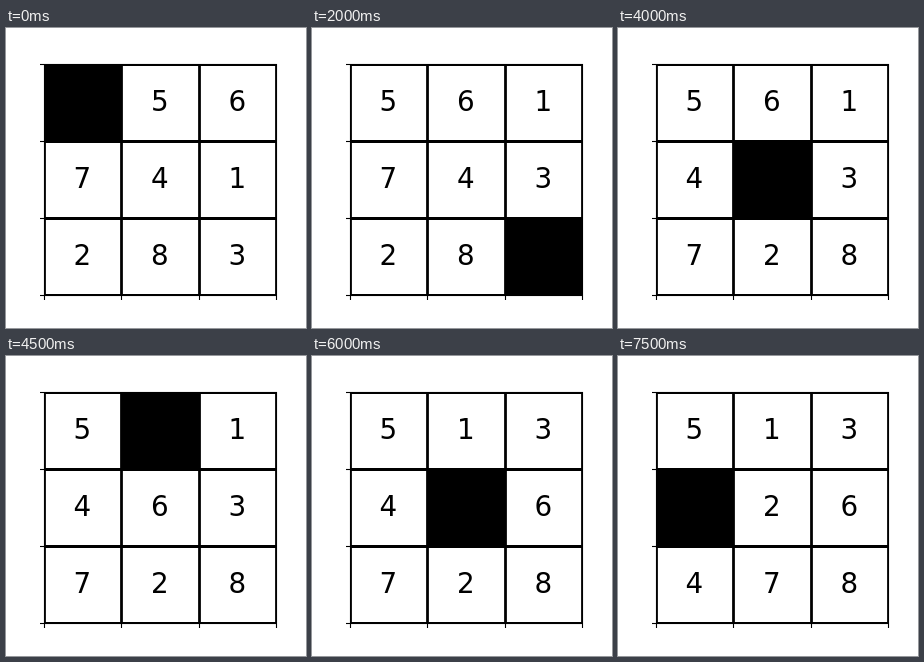
Animation of 300x300 px, one loop 8 s. Source, as an HTML page with a canvas:

```html
<!DOCTYPE html>
<html lang="en">
<head>
<meta charset="utf-8">
<title>Sliding puzzle</title>
<style>
  html, body { margin: 0; width: 100%; height: 100%; overflow: hidden; background: #fff; }
  canvas { display: block; width: 300px; height: 300px; }
</style>
</head>
<body>
<canvas id="stage" width="300" height="300"></canvas>
<script>
const ctx = document.getElementById('stage').getContext('2d');
const STEP = 500;
const START = [0, 5, 6, 7, 4, 1, 2, 8, 3];
// Cell index of the gap after each move
const PATH = [0, 1, 2, 5, 8, 7, 6, 3, 4, 1, 2, 5, 4, 7, 6, 3];
// Pixel positions of the grid lines
const X = [38, 115, 193, 270];
const Y = [36, 113, 190, 267];
const LEFT = 37.5, TOP = 36, CELL_W = 77.5, CELL_H = 77;
const GRID = 2.78, THIN = 1.11, TICK = 5;

function boardAt(step) {
  const board = START.slice();
  for (let i = 1; i <= step; i++) {
    board[PATH[i - 1]] = board[PATH[i]];
    board[PATH[i]] = 0;
  }
  return board;
}

function line(x1, y1, x2, y2, width) {
  ctx.lineWidth = width;
  ctx.beginPath();
  ctx.moveTo(x1, y1);
  ctx.lineTo(x2, y2);
  ctx.stroke();
}

function drawGrid() {
  const right = X[3] + 1, bottom = Y[3] + 1;
  ctx.save();
  ctx.beginPath();
  ctx.rect(X[0], Y[0], right - X[0], bottom - Y[0]);
  ctx.clip();
  for (const x of X) line(x + 0.5, Y[0], x + 0.5, bottom, GRID);
  for (const y of Y) line(X[0], y + 0.5, right, y + 0.5, GRID);
  ctx.restore();

  ctx.lineWidth = THIN;
  ctx.strokeRect(X[0] + 0.5, Y[0] + 0.5, X[3] - X[0], Y[3] - Y[0]);
  for (const x of X) line(x + 0.5, bottom, x + 0.5, Y[3] + TICK, THIN);
  for (const y of Y) line(X[0] - TICK + 1, y + 0.5, X[0], y + 0.5, THIN);
}

function draw(step) {
  ctx.fillStyle = '#fff';
  ctx.fillRect(0, 0, 300, 300);
  ctx.fillStyle = ctx.strokeStyle = '#000';
  ctx.font = '27.78px "DejaVu Sans", sans-serif';
  ctx.textAlign = 'center';
  ctx.textBaseline = 'alphabetic';

  boardAt(step).forEach((n, i) => {
    const col = i % 3, row = Math.floor(i / 3);
    if (n) {
      ctx.fillText(n, LEFT + (col + 0.5) * CELL_W, Math.round(TOP + (row + 0.5) * CELL_H + 8.5));
    } else {
      ctx.fillRect(X[col], Y[row], X[col + 1] - X[col], Y[row + 1] - Y[row]);
    }
  });
  drawGrid();
}

const t0 = performance.now();
function frame() {
  const t = Math.max(0, performance.now() - t0);
  draw(Math.floor(t / STEP) % PATH.length);
  requestAnimationFrame(frame);
}
frame();
</script>
</body>
</html>
```
